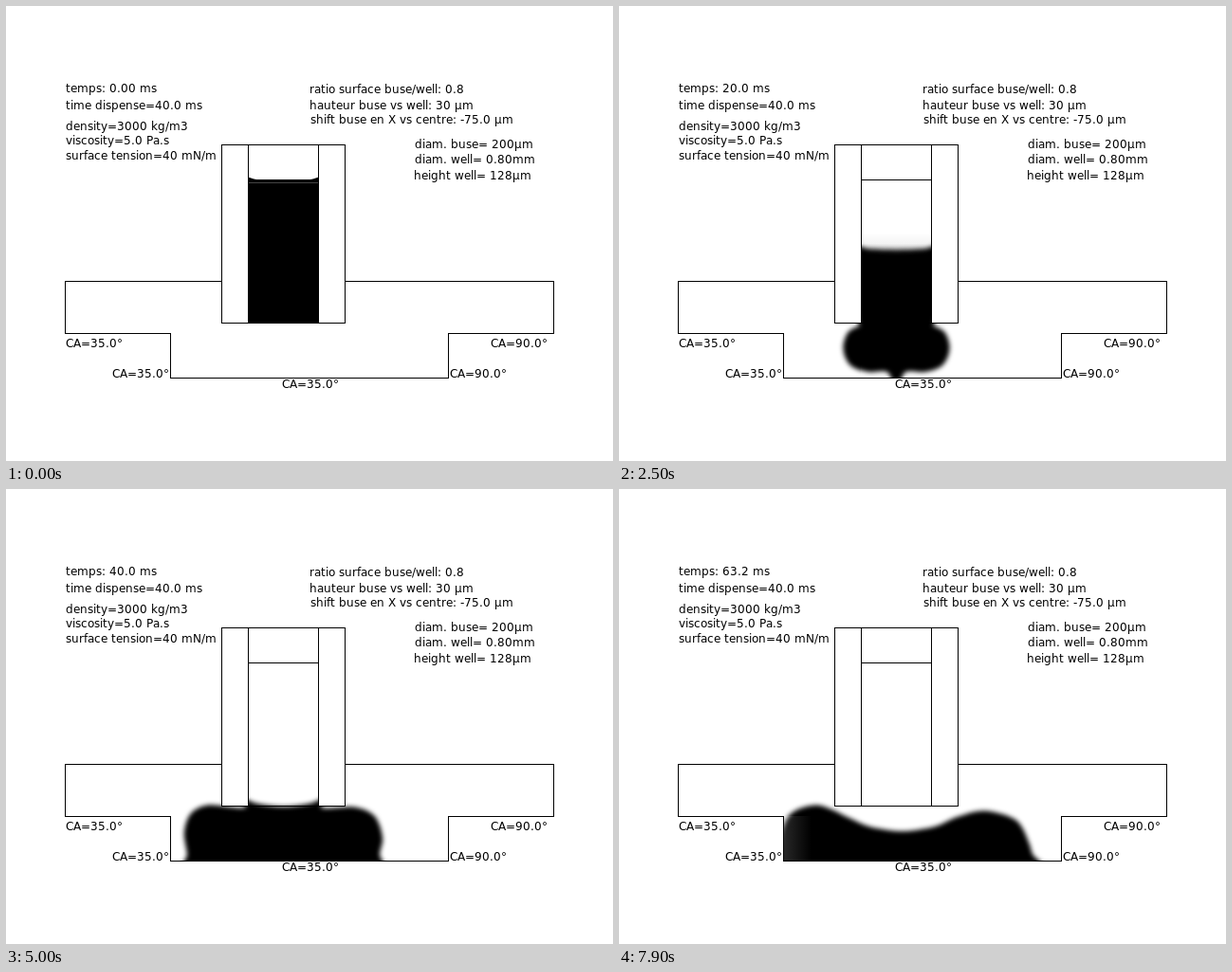
Write an HTML page that moves like this. It is 640 by 480 pixels and loops after 8000 ms.

```html
<!DOCTYPE html>
<html lang="fr">
<head>
<meta charset="utf-8">
<title>Dispense simulation</title>
<style>
html, body { margin: 0; width: 100%; height: 100%; overflow: hidden; background: #fff; }
svg { display: block; }
text { font: 12px "DejaVu Sans", sans-serif; fill: #000; }
.lines { fill: none; stroke: #000; shape-rendering: crispEdges; }
</style>
</head>
<body>
<svg width="640" height="480" viewBox="0 0 640 480">
  <defs>
    <clipPath id="cavity">
      <path d="M62 290H228V335H256V147H329V335H357V290H578V345H467V392H173V345H62Z"/>
    </clipPath>
    <filter id="soft" filterUnits="userSpaceOnUse" x="0" y="0" width="640" height="480">
      <feGaussianBlur id="blur"/>
    </filter>
    <linearGradient id="mist" x2="0" y2="1">
      <stop offset="0" stop-opacity="0"/>
      <stop offset=".5" stop-opacity=".1"/>
      <stop offset="1" stop-opacity=".6"/>
    </linearGradient>
    <linearGradient id="pale">
      <stop offset="0" stop-color="#fff" stop-opacity=".16"/>
      <stop offset="1" stop-color="#fff" stop-opacity="0"/>
    </linearGradient>
    <radialGradient id="spot">
      <stop offset="0" stop-color="#fff" stop-opacity=".45"/>
      <stop offset="1" stop-color="#fff" stop-opacity="0"/>
    </radialGradient>
  </defs>
  <g clip-path="url(#cavity)">
    <rect id="haze" x="256" width="73" height="22" fill="url(#mist)"/>
    <path id="fluid" filter="url(#soft)"/>
    <circle id="air" cx="292.5" cy="390" r="10" fill="url(#spot)"/>
    <rect id="edge" x="173" y="345" width="30" height="47" fill="url(#pale)"/>
    <rect id="rim" x="256" y="186" width="73" height="1" fill="#444"/>
  </g>
  <path class="lines" d="M227 290.5H62.5V345.5H173.5V392.5H466.5V345.5H577.5V290.5H357
    M227.5 146.5H357.5V334.5H227.5Z M255.5 147V334 M329.5 147V334 M255 183.5H330"/>
  <g id="labels"></g>
</svg>
<script>
const LOOP = 8000, STEP = 100, AXIS = 292.5;
const el = id => document.getElementById(id);
const pen = document.createElement("canvas").getContext("2d");
pen.font = '12px "DejaVu Sans", sans-serif';

// Advances are rounded to whole pixels, as hinted screen text does.
function write(text, x, label) {
  const xs = [...label].map(c => {
    const at = x;
    x += Math.round(pen.measureText(c).width);
    return at;
  });
  text.setAttribute("x", xs.join(" "));
  text.textContent = label;
}

function addText(x, y, label) {
  const text = document.createElementNS("http://www.w3.org/2000/svg", "text");
  text.setAttribute("y", y);
  write(text, x, label);
  el("labels").append(text);
  return text;
}

const clock = addText(63, 91, "");
addText(63, 109, "time dispense=40.0 ms");
addText(63, 131, "density=3000 kg/m3");
addText(63, 146, "viscosity=5.0 Pa.s");
addText(63, 162, "surface tension=40 mN/m");
addText(320, 92, "ratio surface buse/well: 0.8");
addText(320, 109, "hauteur buse vs well: 30 µm");
addText(321, 124, "shift buse en X vs centre: -75.0 µm");
addText(431, 150, "diam. buse= 200µm");
addText(431, 166, "diam. well= 0.80mm");
addText(430, 183, "height well= 128µm");
addText(63, 360, "CA=35.0°");
addText(112, 392, "CA=35.0°");
addText(291, 403, "CA=35.0°");
addText(468, 392, "CA=90.0°");
addText(511, 360, "CA=90.0°");

const clamp = (v, lo, hi) => Math.min(hi, Math.max(lo, v));
const mix = (a, b, k) => a + (b - a) * k;
const ramp = (t, a, b) => clamp((t - a) / (b - a), 0, 1);
const ease = (t, a, b) => { const k = ramp(t, a, b); return k * k * (3 - 2 * k); };
const bump = (t, mid, width) => Math.max(0, 1 - Math.abs(t - mid) / width);
const level = t => 184 + .0294 * t;

// One half of the outline, from the floor up to the free surface.
function half(t, dir) {
  const right = dir > 0;
  const land = ease(t, 3000, 4000);
  const lift = ramp(t, 4200, 6300);
  const settle = ramp(t, 6300, 7900);
  const open = ease(t, 5200, 6300);

  const reach = clamp(42.5 + .0194 * (t - 1800), 37, right ? 140 : 112) + (right ? 0 : 8.5 * settle);
  const drop = 1 - (1 - ramp(t, 0, 1800)) ** 1.4;
  const bottom = mix(334, 386, drop) + 14 * land;
  const top = Math.min(337, bottom) - (right ? 4 : 10) * lift + 6.5 * settle;
  const middle = mix((top + bottom) / 2, 367, land) + (right ? 2 : -13) * lift + 5 * settle;
  const radius = 26 + (right ? 11 : 2) * lift + 10 * settle;
  const shoulder = clamp(reach - 38, 0, radius);

  const bow = .0012 + .003 * ramp(t, 4200, 5700) + .0035 * bump(t, 5500, 800);
  const centre = Math.min(level(t) + 4 * ramp(t, 3600, 5000), 361);
  const shift = 6 * open * dir;
  const surface = x => [x + shift, centre - bow * x * x];

  return [
    [10, bottom],
    [mix(reach - radius, reach + 2 + 14 * settle, land), bottom],
    [reach - mix(.29 * radius, 3 - 7 * settle, land), mix(mix(middle, bottom, .71), 386, land)],
    [reach, middle],
    [reach - .29 * shoulder, mix(middle, top, .71)],
    [reach - shoulder, top],
    [mix(40, 58, open) + shift, mix(Math.min(336, bottom), 346, open)],
    surface(mix(52, 40, open)),
    surface(28)
  ].map(([x, y]) => [AXIS + dir * x, y]);
}

function outline(t) {
  const nub = mix(334, 386, 1 - (1 - ramp(t, 0, 1800)) ** 1.4) + 14 * ramp(t, 1700, 2300);
  const dip = Math.min(level(t) + 4 * ramp(t, 3600, 5000), 361);
  return [
    ...half(t, -1),
    [AXIS + 6 * ease(t, 5200, 6300), dip],
    ...half(t, 1).reverse(),
    [AXIS, nub]
  ];
}

// Closed smooth curve; handles are limited by the shorter neighbouring segment.
function smooth(pts) {
  const n = pts.length;
  const at = i => pts[(i + n) % n];
  const dist = (p, q) => Math.hypot(p[0] - q[0], p[1] - q[1]);
  const handle = (i, sign) => {
    const prev = at(i - 1), p = at(i), next = at(i + 1);
    const len = sign * Math.min(dist(prev, p), dist(p, next)) / 3 / (dist(prev, next) || 1);
    return [p[0] + (next[0] - prev[0]) * len, p[1] + (next[1] - prev[1]) * len];
  };
  const curves = pts.map((p, i) => `C${handle(i, 1)} ${handle(i + 1, -1)} ${at(i + 1)}`);
  return `M${pts[0]}${curves.join("")}Z`;
}

function draw(t) {
  const ms = t * .008;
  write(clock, 63, `temps: ${ms.toFixed(ms < 10 ? 2 : 1)} ms`);
  el("fluid").setAttribute("d", smooth(outline(t)));
  el("blur").setAttribute("stdDeviation", Math.min(2.5, .01 + t / 200));
  el("haze").setAttribute("y", level(t) - 18);
  el("haze").setAttribute("opacity", bump(t, 1800, 1300));
  el("air").setAttribute("opacity", bump(t, 4200, 700));
  el("edge").setAttribute("opacity", ramp(t, 6600, 7900));
  el("rim").setAttribute("opacity", t ? 0 : 1);
}

function frame() {
  draw(Math.floor(performance.now() % LOOP / STEP) * STEP);
  requestAnimationFrame(frame);
}
frame();
</script>
</body>
</html>
```
